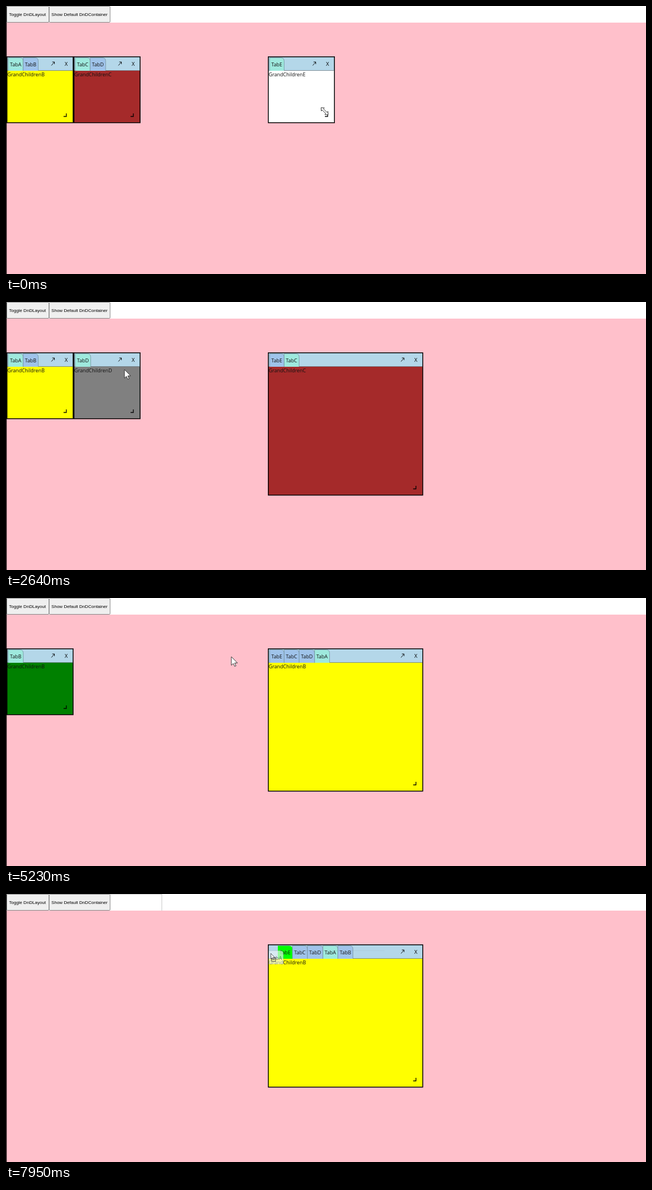
These frames come from a looping animation (1156x484 px, 7.99 s). An HTML page with a canvas:

```html
<!DOCTYPE html>
<html lang="en">
<head>
<meta charset="utf-8">
<title>Tab drag and drop</title>
<style>
html, body { margin: 0; width: 100%; height: 100%; overflow: hidden; background: #fff; }
canvas { display: block; }
</style>
</head>
<body>
<canvas id="stage" width="1156" height="484"></canvas>
<script>
const ctx = document.getElementById('stage').getContext('2d');
const LOOP = 7990, TOP = 91, SMALL = [121, 120.5], BIG = [280.5, 258.5];
const UI = '9px "Open Sans", "Noto Sans", sans-serif';
const BUTTON = '8.08px "Liberation Sans", Arial, sans-serif';

const fills = { A: '#ff0', B: '#008000', C: '#a52a2a', D: '#808080', E: '#fff' };
const labels = { A: 'B', B: 'B', C: 'C', D: 'D', E: 'E' };

// start time, then the tabs of the left, middle and right window
const layouts = [
  [0, 'AB', 'CD', 'E'],
  [2200, 'AB', 'D', 'EC'],
  [3660, 'AB', '', 'ECD'],
  [5200, 'B', '', 'ECDA'],
  [6860, '', '', 'ECDAB']
];
// tab, start, end, grip offset, ghost size
const drags = [
  ['C', 1400, 2200, 7, SMALL],
  ['D', 3040, 3660, 7, SMALL],
  ['A', 4430, 5200, 7, SMALL],
  ['B', 5680, 6860, 7, SMALL],
  ['A', 7200, LOOP, 4.5, BIG]
];
// tab, start, end of a drop target in the right window
const hovers = [['A', 6253, 6440], ['E', 7843, LOOP]];
const sizes = [[50, ...SMALL], [600, 286, 225], [760, ...BIG]];

// time, x, y, pointer shape from that time on
const moves = [
  [0, 575.5, 190, 'size'], [50, 575.5, 190, 'size'], [600, 742, 294, 'size'],
  [760, 735, 327, 'size'], [820, 717, 315, 'arrow'], [880, 717, 315, 'arrow'],
  [1010, 147, 107, 'arrow'], [1190, 152, 111, 'hand'], [1380, 150, 109, 'point'],
  [1400, 150, 109, 'drag'], [1600, 260, 152, 'drag'], [1800, 420, 150, 'drag'],
  [2010, 560, 106, 'drag'], [2200, 560, 106, 'arrow'], [2640, 214, 122, 'arrow'],
  [2840, 144, 108, 'hand'], [3040, 144, 108, 'drag'], [3250, 280, 150, 'drag'],
  [3500, 500, 125, 'drag'], [3660, 601, 103, 'hand'], [3710, 601, 103, 'arrow'],
  [3790, 484, 123, 'arrow'], [3840, 484, 123, 'arrow'], [4240, 27, 106, 'hand'],
  [4430, 25, 107, 'drag'], [4650, 160, 162, 'drag'], [4900, 420, 140, 'drag'],
  [5160, 640, 106, 'drag'], [5200, 640, 106, 'arrow'], [5230, 407, 106, 'arrow'],
  [5290, 407, 106, 'arrow'], [5560, 22, 108, 'hand'], [5680, 22, 108, 'drag'],
  [5850, 250, 150, 'drag'], [6000, 490, 139, 'drag'], [6250, 570, 110, 'drag'],
  [6410, 609, 104, 'drag'], [6500, 636, 106, 'drag'], [6860, 632, 108, 'arrow'],
  [7050, 573, 106, 'hand'], [7200, 573, 106, 'drag'], [7650, 481, 102, 'drag'],
  [LOOP, 478, 108, 'drag']
];

const clamp = v => Math.max(0, Math.min(1, v));

function sample(keys, t) {
  const i = keys.findLastIndex(k => k[0] <= t);
  if (i < 0) return keys[0].slice(1);
  const a = keys[i], b = keys[i + 1] || a;
  const u = b === a ? 0 : (t - a[0]) / (b[0] - a[0]);
  return [a[1] + (b[1] - a[1]) * u, a[2] + (b[2] - a[2]) * u, a[3]];
}

function box(x, y, w, h, color) {
  ctx.fillStyle = color;
  ctx.fillRect(x, y, w, h);
}

function text(s, x, y, font = UI, color = '#111') {
  ctx.font = font;
  ctx.fillStyle = color;
  ctx.fillText(s, x, y);
}

function line(points, width, color = '#000') {
  ctx.beginPath();
  points.forEach(p => ctx.lineTo(...p));
  ctx.lineWidth = width;
  ctx.strokeStyle = color;
  ctx.stroke();
}

function button(x, w, label) {
  ctx.beginPath();
  ctx.roundRect(x + .5, .5, w - 1, 29, 1.5);
  ctx.fillStyle = '#efefef';
  ctx.fill();
  ctx.lineWidth = 1;
  ctx.strokeStyle = '#858585';
  ctx.stroke();
  text(label, x + 4.5, 18, BUTTON, '#000');
}

function tabWidth(tab) {
  ctx.font = UI;
  return ctx.measureText('Tab' + tab).width + 6.6;
}

function tabShape(x, y, w, h, fill, border) {
  ctx.beginPath();
  ctx.moveTo(x, y + h);
  ctx.lineTo(x, y);
  ctx.lineTo(x + w - 6, y);
  ctx.quadraticCurveTo(x + w, y, x + w, y + 6);
  ctx.lineTo(x + w, y + h);
  ctx.fillStyle = fill;
  ctx.fill();
  if (border) {
    ctx.lineWidth = .8;
    ctx.strokeStyle = border;
    ctx.stroke();
  }
}

function panel(x, [w, h], tabs, active, t) {
  const r = x + w, b = TOP + h;
  box(x, TOP, w, h, '#000');
  box(x + 1.5, TOP + 1.5, w - 3, 24, '#b4d7e9');
  box(x + 1.5, 116.5, w - 3, b - 118, fills[active]);
  line([[x + 1.5, 116.5], [r - 1.5, 116.5]], .8, '#75848d');

  let left = x + 3;
  for (const tab of tabs) {
    const tw = tabWidth(tab);
    const hover = x > 400 && hovers.find(([n, from, to]) => n === tab && t >= from && t < to + 200);
    let lime = false;
    if (hover) {
      const [, from, to] = hover;
      lime = t < to;
      left += 28 * Math.min(clamp((t - from) / 200), clamp((to + 200 - t) / 200));
    }
    const fill = lime ? '#0f0' : tab === active ? '#9ee9dd' : '#9fc3ea';
    tabShape(left, 93.5, tw, 23.4, fill, lime ? '' : '#73919d');
    text('Tab' + tab, left + 3.2, 109);
    left += tw;
  }

  line([[r - 40, 107.5], [r - 34.5, 101]], .9);
  line([[r - 38.5, 101], [r - 34.5, 101], [r - 34.5, 105]], .9);
  text('X', r - 16, 108, UI.replace('9px', '9.5px'), '#000');
  text('GrandChildren' + labels[active], x + 1.5, 127);
  line([[r - 18, b - 12], [r - 13, b - 12], [r - 13, b - 17.5]], 1.3);
}

function ghost(tab, x, y, [w, h]) {
  const big = w > 200, tw = tabWidth(tab);
  const edge = ctx.createLinearGradient(x, y, x + 210, y + (big ? 210 : 0));
  edge.addColorStop(0, 'rgba(125,135,140,.4)');
  edge.addColorStop(1, big ? 'rgba(125,135,140,0)' : 'rgba(125,135,140,.4)');
  ctx.lineWidth = .8;
  ctx.strokeStyle = edge;
  if (big) line([[x + tw, y + .5], [x + 210, y + .5]], .6, edge);
  else ctx.strokeRect(x + .5, y + .5, w - 1, h - 1);
  tabShape(x + 1, y + .5, tw - 1, 24.5, 'rgba(236,244,248,.65)', 'rgba(120,140,150,.35)');
  text('Tab' + tab, x + 4, y + 17, UI, 'rgba(20,25,30,.6)');
}

function outline(points, fill = '#fff', width = .9) {
  ctx.beginPath();
  points.forEach(p => ctx.lineTo(...p));
  ctx.closePath();
  ctx.fillStyle = fill;
  ctx.fill();
  ctx.lineWidth = width;
  ctx.strokeStyle = '#222';
  ctx.stroke();
}

const arrow = [[0, 0], [0, 15.5], [3.6, 12.2], [6, 17.5], [8.4, 16.5], [6, 11.3], [11, 11.3]];

const pointers = {
  arrow() { outline(arrow); },
  drag() {
    ctx.lineWidth = .8;
    ctx.strokeStyle = '#333';
    ctx.strokeRect(1.5, 7.5, 7, 7);
    ctx.scale(.66, .66);
    outline(arrow, 'rgba(255,255,255,.8)', 1.1);
  },
  size() {
    ctx.rotate(Math.PI / 4);
    outline([[-9, 0], [-4.5, -4], [-4.5, -1.5], [4.5, -1.5], [4.5, -4],
      [9, 0], [4.5, 4], [4.5, 1.5], [-4.5, 1.5], [-4.5, 4]]);
  },
  hand() {
    ctx.lineJoin = 'round';
    outline([[-2.5, 6], [-5.3, 1], [-4.3, 0], [-2.8, 1.5], [-3.8, -4], [-2.4, -4.6],
      [-1.2, -5.8], [.4, -5.4], [2.2, -5], [3.4, -3.4], [5, -2.6], [4.4, 3], [3.2, 6]]);
    for (const x of [-1.2, .8, 2.8]) line([[x, -4], [x, -.5]], .7, '#333');
  },
  point() {
    ctx.lineJoin = 'round';
    outline([[-1.5, 7], [-4.5, 1.5], [-3.4, .6], [-2, 2], [-2.6, -6], [-1, -6.6], [0, -2],
      [2, -2], [4, -1.2], [5.2, .2], [4.6, 4], [3.6, 7]]);
    for (const x of [1.2, 3]) line([[x, -1], [x, 1.5]], .7, '#333');
  }
};

function draw(t) {
  box(0, 0, 1156, 30, '#fff');
  box(0, 30, 1156, 454, '#ffc0cb');
  box(0, 0, 1.2, 484, '#000');
  const drag = drags.find(d => t >= d[1] && t < d[2]);
  if (drag && drag[4] === BIG) line([[188, .5], [281.5, .5], [281.5, 30]], .8, '#bbb');
  button(1, 77, 'Toggle DnDLayout');
  button(77.5, 111, 'Show Default DnDContainer');

  const [, first, second, third] = layouts.findLast(l => l[0] <= t);
  if (first) panel(1, SMALL, first, first[0], t);
  if (second) panel(122, SMALL, second, second[0], t);
  const [w, h] = sample(sizes, t);
  panel(473, [w, h], third, t >= 7200 ? 'A' : third.at(-1), t);

  const [x, y, shape] = sample(moves, t);
  if (drag) ghost(drag[0], x - drag[3], y - 5.5, drag[4]);
  ctx.save();
  ctx.translate(x, y);
  pointers[shape]();
  ctx.restore();
}

let start;
function tick(now) {
  start ??= now;
  draw((now - start) % LOOP);
  requestAnimationFrame(tick);
}
requestAnimationFrame(tick);
</script>
</body>
</html>
```
